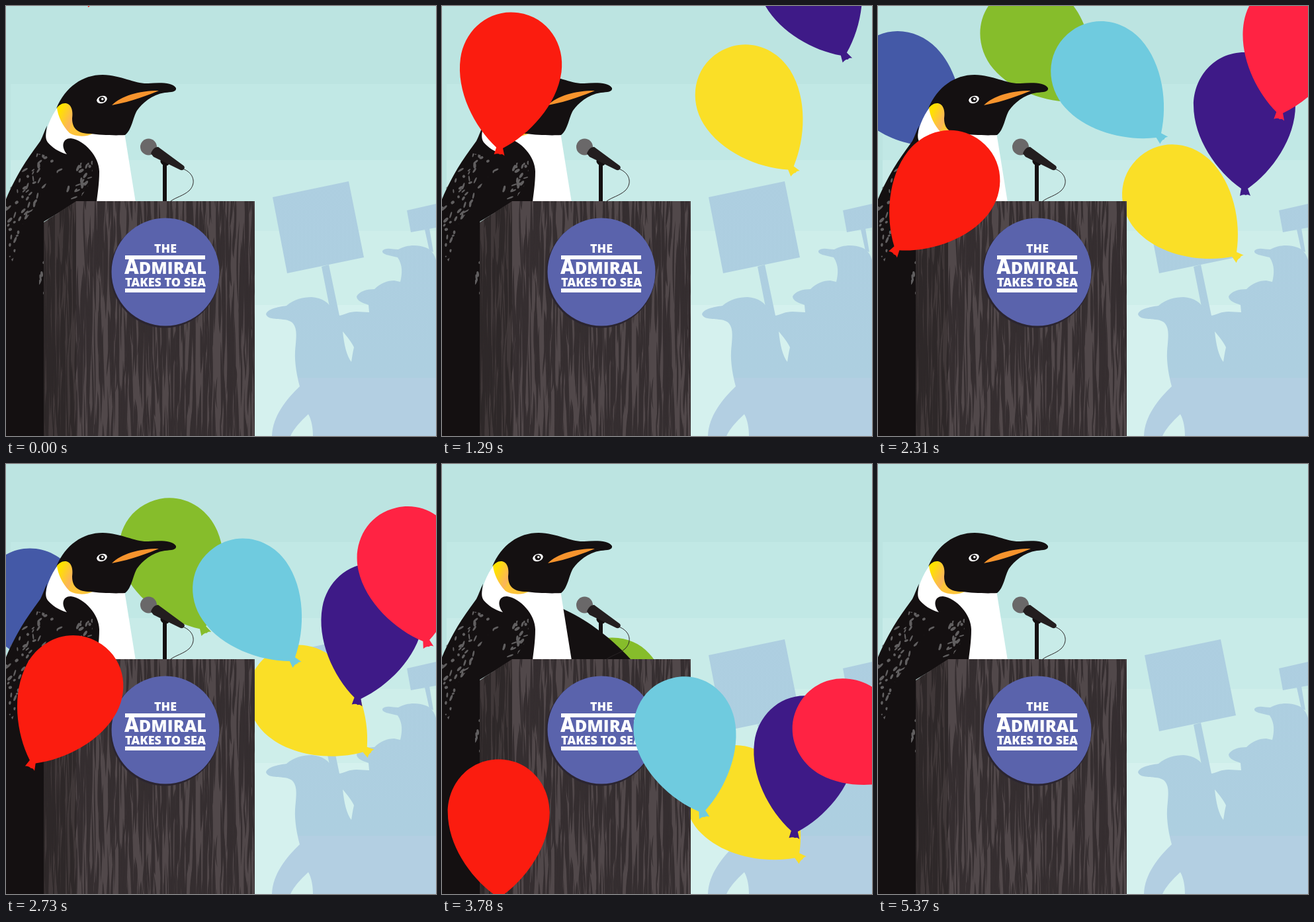
An HTML page with a canvas for the animation above (5400 ms loop, 650x650 px).

```html
<!DOCTYPE html>
<html lang="en">
<head>
<meta charset="utf-8">
<title>Balloons at the podium</title>
<style>
html, body { margin: 0; width: 100%; height: 100%; overflow: hidden; background: #bce4e1; }
canvas { display: block; width: 650px; height: 650px; }
</style>
</head>
<body>
<canvas id="stage" width="650" height="650"></canvas>
<script>
const SIZE = 650, LOOP = 5400, STEP = 30;
const BLACK = '#141011', FONT = '"Open Sans", "Noto Sans", sans-serif';
const stage = document.getElementById('stage').getContext('2d');

let seed = 11;
function rnd(a = 1, b) {
  seed = (seed * 1664525 + 1013904223) % 4294967296;
  const u = seed / 4294967296;
  return b === undefined ? u * a : a + u * (b - a);
}

function layer(paint) {
  const c = document.createElement('canvas');
  c.width = c.height = SIZE;
  paint(c.getContext('2d'));
  return c;
}

function fill(g, color, d) {
  g.fillStyle = color;
  g.fill(new Path2D(d));
}

function disc(g, color, x, y, rx, ry = rx, rot = 0) {
  g.fillStyle = color;
  g.beginPath();
  g.ellipse(x, y, rx, ry, rot, 0, 7);
  g.fill();
}

// ---------- static scenery ----------

function paintBackdrop(g) {
  const bands = [[0, '#bce4e1'], [118, '#c1e8e5'], [233, '#c8ebe8'], [340, '#ceeeea'], [452, '#d5f1ee']];
  for (const [y, color] of bands) {
    g.fillStyle = color;
    g.fillRect(y && y < 300 ? 7 : 0, y, SIZE, SIZE - y);
  }
  const tint = g.createLinearGradient(0, 0, 0, SIZE);
  tint.addColorStop(0, '#aecee1');
  tint.addColorStop(562 / SIZE, '#adcfe0');
  tint.addColorStop(562 / SIZE, '#b3cfe2');
  tint.addColorStop(1, '#b3cfe2');
  fill(g, tint, 'M403 289L518 265L541 380L425 404Z');
  fill(g, tint, 'M477 394L488 391L504 468L510 495L492 470Z');
  fill(g, tint, 'M606 309L650 299V335L612 342Z');
  fill(g, tint, 'M633 338L640 336L646 372L640 370Z');
  fill(g, tint, `M393 466C395 458 410 455 424 453C436 443 449 440 462 440
    C478 441 489 449 494 460L504 468C514 466 518 462 530 462L549 463L548 452
    C540 449 530 446 530 439C534 431 546 428 557 428C566 419 576 415 587 415L596 417
    C599 405 600 392 592 380C580 377 568 376 569 370C574 364 585 368 593 368
    C604 361 622 360 634 365C643 368 648 376 650 384V650H464
    C464 638 462 626 457 617C445 628 435 639 430 650H402
    C403 620 424 594 444 575C440 560 436 540 437 522C439 500 441 486 432 478
    C422 470 396 477 393 466Z`);
  fill(g, '#d5f1ee', 'M509 492C516 500 523 509 526 516C524 524 523 532 522 538C515 529 511 512 509 492Z');
}

function paintBody(g) {
  fill(g, '#fff', `M79 152C67 168 60 186 59 203L80 230H130L134 297H196L178 185L100 180Z`);
  fill(g, BLACK, `M0 292C18 250 36 226 52 204C56 196 59 187 62 181C60 194 59 200 63 206
    C70 214 80 221 92 224C83 213 85 200 98 200C119 203 141 228 141 250
    C141 270 138 285 137 297H106L57 326V650H0Z`);
  g.save();
  g.clip(new Path2D(`M44 222L70 228L95 240L131 234L130 262L110 294L88 292L96 262L66 258
    L46 300L25 330L10 386L0 372V284ZM50 384L58 380V442H50Z`));
  for (let i = 0; i < 330; i++) {
    const x = rnd(134), y = rnd(218, 442);
    disc(g, '#615f60', x, y, rnd(2, 5.5), rnd(1, 2.2), rnd(-1.7, -0.3));
  }
  g.restore();
}

function grain(g, x0, x1, count, color) {
  g.fillStyle = color;
  for (let i = 0; i < count; i++) {
    const x = rnd(x0, x1), y = rnd(230, 650), len = rnd(45, 190);
    const w = rnd(1.2, 3.4), a = rnd(-5, 5), b = rnd(-5, 5), end = x + rnd(-2, 2);
    g.beginPath();
    g.moveTo(x, y);
    g.bezierCurveTo(x + a + w, y + len * 0.3, x + b + w, y + len * 0.7, end, y + len);
    g.bezierCurveTo(x + b - w, y + len * 0.7, x + a - w, y + len * 0.3, x, y);
    g.fill();
  }
}

function panel(g, d, base, dark, x0, x1, count) {
  g.save();
  g.clip(new Path2D(d));
  g.fillStyle = base;
  g.fillRect(0, 0, SIZE, SIZE);
  grain(g, x0, x1, count, dark);
  g.restore();
}

// Sets a line at the size that fills the given width; returns that size.
function fitText(g, text, x, y, width) {
  g.font = `800 100px ${FONT}`;
  const size = width * 100 / g.measureText(text).width;
  g.font = `800 ${size}px ${FONT}`;
  g.fillText(text, x, y);
}

function paintBadge(g) {
  disc(g, '#2b2530', 240, 404, 82.5);
  disc(g, '#5a63ac', 241, 402, 81.5);
  g.fillStyle = '#fff';
  g.fillRect(180, 377, 121, 6);
  g.fillRect(180, 427, 121, 6);
  fitText(g, 'THE', 224, 373, 34);
  g.font = `800 30px ${FONT}`;
  g.fillText('A', 179, 405);
  const x = 179 + g.measureText('A').width;
  fitText(g, 'DMIRAL', x, 405, 303 - x);
  fitText(g, 'TAKES TO SEA', 180, 424, 122);
}

function paintPodium(g) {
  panel(g, 'M57 327L106 295V650H57Z', '#403839', '#2e2829', 55, 108, 95);
  panel(g, 'M106 295H376V650H106Z', '#51484a', '#352e30', 104, 378, 460);
  paintBadge(g);
  g.strokeStyle = '#2a2526';
  g.lineWidth = 1;
  g.stroke(new Path2D('M267 246C284 252 288 268 277 279C268 287 257 289 249 295'));
  fill(g, BLACK, 'M237 236H243V295H237Z');
  disc(g, BLACK, 240, 236, 7, 5, 0.5);
  disc(g, '#6a6869', 215.5, 213, 12.5);
  fill(g, '#231e1f', 'M219 223C221 217 225 213 230 213L268 241C272 244 269 249 264 248L223 228Z');
}

// ---------- moving parts ----------

const ease = u => { u = Math.min(1, Math.max(0, u)); return u * u * (3 - 2 * u); };
const ramp = (t, a, b) => ease((t - a) / (b - a));

function paintWing(g, t) {
  const lift = ramp(t, 2900, 3700) - ramp(t, 4560, 5160);
  g.save();
  g.translate(165, 212);
  g.rotate((1 - lift) * 50 * Math.PI / 180);
  fill(g, BLACK, 'M-10 -2L18 7C50 22 85 45 120 83L130 100L110 140L0 90Z');
  g.restore();
}

function paintHead(g, t) {
  const nod = ramp(t, 2880, 3150) - ramp(t, 3240, 3700);
  g.save();
  g.translate(-2 * nod, -2.4 * nod);
  const glow = g.createLinearGradient(78, 160, 104, 172);
  glow.addColorStop(0.1, '#ffe100');
  glow.addColorStop(0.85, '#fbb45c');
  glow.addColorStop(1, '#fdc43a');
  fill(g, glow, 'M77 153C83 144 100 143 104 153L110 186L131 193C122 198 105 198 96 192C86 182 78 166 77 153Z');
  fill(g, BLACK, `M76 155C90 122 116 104 146 104C176 105 195 118 215 117
    C232 116 251 115 257 124C258 130 250 130 240 131C220 134 206 147 198 158
    C192 168 190 188 180 195C165 196 142 195 128 193C109 193 100 186 100 170
    C102 157 98 147 89 147C84 147 80 150 76 155Z`);
  fill(g, '#f7942d', 'M160 150C174 136 200 128 231 128C216 134 192 144 160 150Z');
  disc(g, '#fff', 145, 141.5, 8, 5.6, -0.3);
  disc(g, BLACK, 145, 141.3, 4.6, 4);
  disc(g, '#fff', 145.8, 140.8, 1.8);
  g.restore();
}

const SHAPE = new Path2D(`M0 -80C46 -80 77 -42 77 0C77 50 42 100 5 126L9 137
  Q5 134 2 136Q-1 134 -7 137L-5 126C-42 100 -77 50 -77 0C-77 -42 -46 -80 0 -80Z`);

// Keys: time, x, y, tilt in degrees
const BACK = [
  ['#4459a7', [1740, 24, 4, -62], [2310, 33, 117, -44], [3180, 45, 305, -30]],
  ['#86bd2b', [1740, 190, -86, -75], [2310, 233, 45, -40], [3180, 257, 221, -10], [4410, 255, 470, 5]]
];
const MIDDLE = [
  ['#fadf27', [0, 482, -138, -18], [780, 467, 57, -30], [1740, 456, 200, -34],
    [2310, 448, 288, -46], [3180, 444, 419, -52], [4410, 450, 593, -36], [5370, 452, 736, -20]]
];
const FRONT = [
  ['#3e1a87', [1740, 554, 43, -14], [2310, 554, 150, 0], [3180, 553, 316, 16], [4410, 543, 550, -7]],
  ['#ff2343', [1740, 673, -92, 20], [2310, 629, 37, 10], [3180, 597, 259, -38], [4410, 631, 550, -84]],
  ['#6fcbdf', [1740, 326, -19, 2], [2310, 340, 102, -42], [3180, 376, 286, -20],
    [4410, 350, 524, -6], [5370, 340, 738, 4]],
  ['#fb1c0f', [0, 100, -133, -13], [780, 102, 2, -5], [1740, 106, 167, 21],
    [2310, 106, 267, 38], [3180, 92, 417, 13], [4410, 80, 643, -13]]
];

const slope = (p, q, c) => (q[c] - p[c]) / (q[0] - p[0]);

// Smooth curve through the keys, straight beyond both ends.
function track(keys, t, c) {
  const n = keys.length - 1;
  if (t <= keys[0][0]) return keys[0][c] + (t - keys[0][0]) * slope(keys[0], keys[1], c);
  if (t >= keys[n][0]) return keys[n][c] + (t - keys[n][0]) * slope(keys[n - 1], keys[n], c);
  let i = 0;
  while (t > keys[i + 1][0]) i++;
  const p = keys[i], q = keys[i + 1], h = q[0] - p[0], u = (t - p[0]) / h;
  const m0 = slope(keys[Math.max(0, i - 1)], q, c) * h;
  const m1 = slope(p, keys[Math.min(n, i + 2)], c) * h;
  const u2 = u * u, u3 = u2 * u;
  return (2 * u3 - 3 * u2 + 1) * p[c] + (u3 - 2 * u2 + u) * m0
    + (3 * u2 - 2 * u3) * q[c] + (u3 - u2) * m1;
}

function paintBalloons(g, list, t) {
  for (const [color, ...keys] of list) {
    g.save();
    g.translate(track(keys, t, 1), track(keys, t, 2));
    g.rotate(track(keys, t, 3) * Math.PI / 180);
    g.fillStyle = color;
    g.fill(SHAPE);
    g.restore();
  }
}

const backdrop = layer(paintBackdrop);
const body = layer(paintBody);
const podium = layer(paintPodium);

function draw(t) {
  stage.drawImage(backdrop, 0, 0);
  paintBalloons(stage, BACK, t);
  paintWing(stage, t);
  stage.drawImage(body, 0, 0);
  paintHead(stage, t);
  paintBalloons(stage, MIDDLE, t);
  stage.drawImage(podium, 0, 0);
  paintBalloons(stage, FRONT, t);
}

let start;
function tick(now) {
  if (start === undefined) start = now;
  const t = (now - start) % LOOP;
  draw(Math.floor(t / STEP) * STEP);
  requestAnimationFrame(tick);
}
draw(0);
requestAnimationFrame(tick);
</script>
</body>
</html>
```
